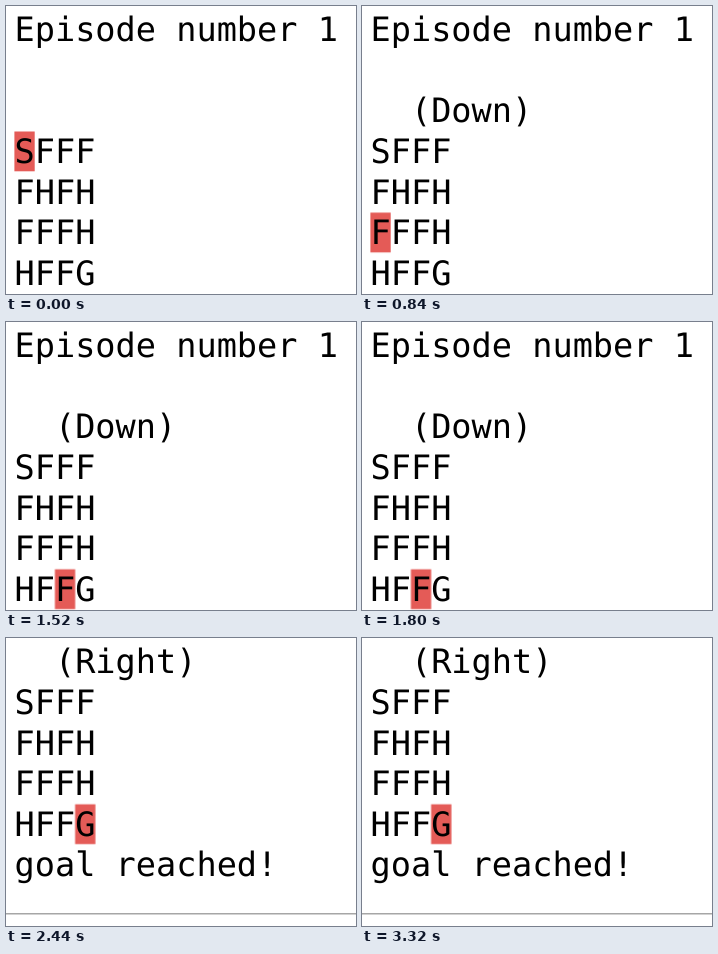
An HTML page that plays this animation: 350 by 288 pixels, repeating every 3.72 s.

```html
<!DOCTYPE html>
<html lang="en">
<head>
<meta charset="utf-8">
<title>Grid walk</title>
<style>
  html, body { margin: 0; width: 100%; height: 100%; overflow: hidden; background: #fff; }
  svg { display: block; width: 350px; height: 288px; }
  text {
    font: 33.6px "DejaVu Sans Mono", monospace;
    text-rendering: geometricPrecision;
    white-space: pre;
  }
  .page, .cursor, .down, .right { animation: 3720ms step-end infinite; }
  .page { animation-name: scroll; }
  .cursor { animation-name: walk; fill: #e45b57; }
  .down { animation-name: down; }
  .right { animation-name: right; }

  /* Moves at 320, 640, 920, 1240, 1520 and 1840 ms */
  @keyframes walk {
    0% { transform: translate(0, 0); }
    8.602% { transform: translate(0, 40.7px); }
    17.204% { transform: translate(0, 81.1px); }
    24.731% { transform: translate(20.2px, 81.1px); }
    33.333% { transform: translate(40.5px, 81.1px); }
    40.86% { transform: translate(40.5px, 121.8px); }
    49.462%, 100% { transform: translate(60.7px, 121.8px); }
  }
  @keyframes down {
    0%, 24.731%, 49.462%, 100% { opacity: 0; }
    8.602%, 40.86% { opacity: 1; }
  }
  @keyframes right {
    0%, 40.86% { opacity: 0; }
    24.731%, 49.462%, 100% { opacity: 1; }
  }
  @keyframes scroll {
    0% { transform: translateY(0); }
    49.462%, 100% { transform: translateY(-81px); }
  }
</style>
</head>
<body>
<svg viewBox="0 0 350 288">
  <g class="page">
    <rect class="cursor" x="8.4" y="125.5" width="20.3" height="39.8"/>
    <text x="8.5" y="35">Episode number 1</text>
    <text class="down" x="8.5" y="116">  (Down)</text>
    <text class="right" x="8.5" y="116">  (Right)</text>
    <text x="8.5" y="157">SFFF</text>
    <text x="8.5" y="198">FHFH</text>
    <text x="8.5" y="238">FFFH</text>
    <text x="8.5" y="279">HFFG</text>
    <text x="8.5" y="319">goal reached!</text>
    <rect y="356" width="350" height="1.5" fill="#a6a6a6"/>
  </g>
</svg>
</body>
</html>
```
